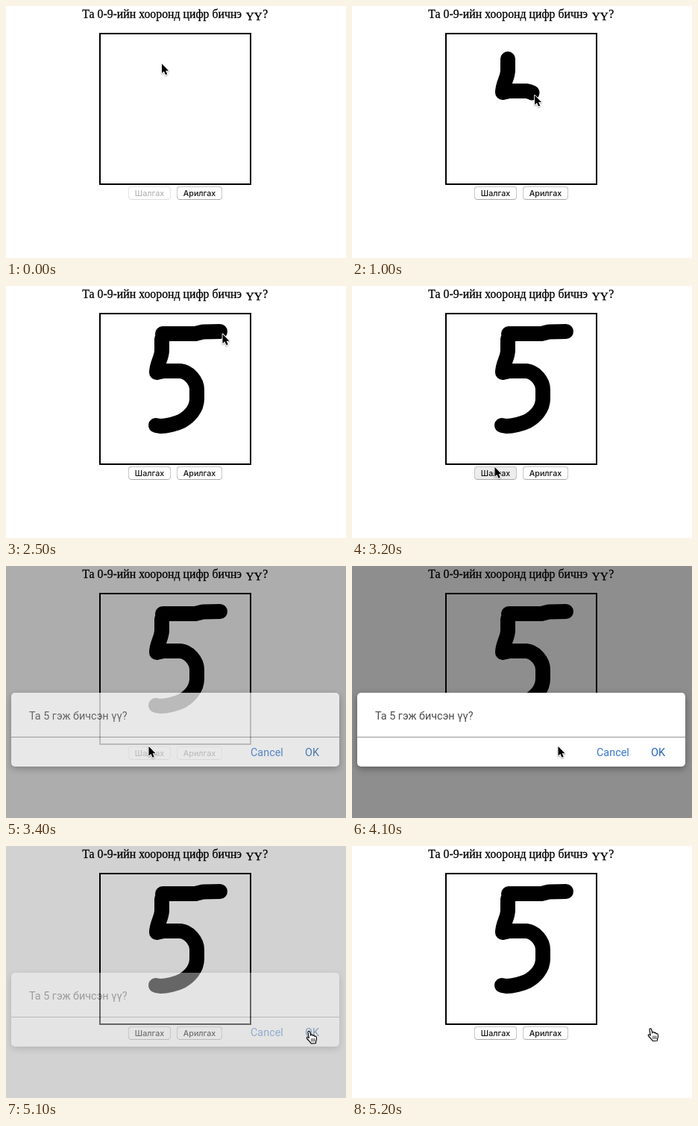
Animation of 456 by 338 pixels, one loop 5300 ms. Source, as an HTML page with a canvas:

```html
<!DOCTYPE html>
<html lang="mn">
<head>
<meta charset="utf-8">
<title>Цифр бичих</title>
<style>
html, body { margin: 0; width: 456px; height: 338px; overflow: hidden; background: #fff; }
canvas { display: block; }
svg { position: absolute; left: 0; top: 0; }
</style>
</head>
<body>
<canvas id="stage" width="456" height="338"></canvas>
<svg width="0" height="0"><path id="ruler"/></svg>
<script>
const W = 456, H = 338, LOOP = 5300, STEP = 100;
const SERIF = '"Liberation Serif", serif';
const UI = 'Inter, sans-serif';
const DIALOG = 'Roboto, sans-serif';
const ctx = document.getElementById('stage').getContext('2d');
const ruler = document.getElementById('ruler');

const linear = k => k;
const speedUp = k => k ** 1.65;
const slowDown = k => 1 - (1 - k) ** 2.7;

// One leg of the pointer's way; times count steps of 100 ms.
function leg(from, to, d, ease = linear, pen = false) {
  const track = ruler.cloneNode();
  track.setAttribute('d', d);
  const length = track.getTotalLength();
  const run = n => length * ease(Math.min(1, Math.max(0, (n - from) / (to - from))));
  return { from, pen, run, shape: new Path2D(d), at: n => track.getPointAtLength(run(n)) };
}

const BODY = 'M209 71V86C209 97 202 104 202 116L211 114H234C245 115 256 127 256 139' +
  'V151C256 165 246 175 236 181C228 185 215 188 207 188L201 187';
const legs = [
  leg(0, 2, 'M208.5 77L212 76.5'),
  leg(4, 14, BODY, speedUp, true),
  leg(14.5, 21, 'M204 183C205 140 245 115 211 74.5'),
  leg(22, 25, 'M210 64H254L264 61.5L287 61', linear, true),
  leg(25.1, 33, 'M289 63C270 130 190 200 192 274L191 241.5', slowDown),
  leg(41, 46, 'M276 241.5Q340 268 416 258', slowDown),
  leg(46, 50, 'M416 258L412 252'),
  leg(50, 52, 'M412 252L400 245')
];

function pointerAt(n) {
  const current = legs.findLast(l => l.from <= n);
  const { x, y } = current.at(n);
  const lead = current.pen ? 3 : 0;
  return [x + lead, y + lead];
}

function dialogAlpha(n) {
  if (n < 34) return 0;
  if (n > 50) return 0.4 * (52 - n);
  return 1 - 0.27 * (Math.max(0, 38 - n) / 4) ** 2;
}

function text(c, str, x, y, font, color, align = 'left') {
  c.font = font;
  c.fillStyle = color;
  c.textAlign = align;
  c.fillText(str, x, y);
}

function heading(str, x, y, size) {
  text(ctx, str, x, y, `${size}px ${SERIF}`, '#000');
  ctx.strokeStyle = '#000';
  ctx.lineWidth = 0.3;
  ctx.strokeText(str, x, y);
}

function box(c, x, y, w, h, r, fill) {
  c.beginPath();
  c.roundRect(x, y, w, h, r);
  c.fillStyle = fill;
  c.fill();
}

function button(label, x, w, state) {
  const off = state === 'disabled';
  box(ctx, x, 242, w, 18, 4.5, off ? '#dcdcdc' : '#a8a8a8');
  box(ctx, x, 242, w, 17, 4.5, off ? '#e6e6e6' : '#c8c8c8');
  box(ctx, x + 1, 243, w - 2, 16, 3.5, state === 'pressed' ? '#ededed' : '#fff');
  text(ctx, label, x + w / 2, 255, '500 10.7px ' + UI, off ? '#b4b4b4' : '#111', 'center');
}

function drawPen(stroke, n) {
  if (n < stroke.from) return;
  ctx.save();
  ctx.setLineDash([Math.max(0.01, stroke.run(n)), 999]);
  ctx.lineWidth = 20;
  ctx.lineCap = ctx.lineJoin = 'round';
  ctx.strokeStyle = '#000';
  ctx.stroke(stroke.shape);
  ctx.restore();
}

function drawPage(n) {
  ctx.fillStyle = '#fff';
  ctx.fillRect(0, 0, W, H);
  heading('Та 0-9-ийн хооронд цифр бичнэ', 102.3, 16, 15.8);
  heading('ҮҮ', 321.8, 19, 15.2);
  heading('?', 344.3, 16, 15.8);
  ctx.lineWidth = 2;
  ctx.strokeStyle = '#000';
  ctx.strokeRect(126, 37, 202, 202);
  for (const l of legs) if (l.pen) drawPen(l, n);
  const pressed = n === 32 || n === 33;
  button('Шалгах', 164, 57, n < 4 ? 'disabled' : pressed ? 'pressed' : '');
  button('Арилгах', 229, 61, '');
}

// The dialog is composed on its own layer so that it fades as a whole.
function dialogLayer(hover) {
  const layer = document.createElement('canvas');
  layer.width = W;
  layer.height = H;
  const c = layer.getContext('2d');
  c.shadowColor = 'rgba(0,0,0,0.35)';
  c.shadowBlur = 10;
  c.shadowOffsetY = 3;
  box(c, 7, 170, 440, 99, 5, '#fff');
  c.shadowColor = 'transparent';
  c.fillStyle = '#949898';
  c.fillRect(7, 229, 440, 1);
  const font = '14.4px ' + DIALOG;
  text(c, 'Та 5 гэж бичсэн үү?', 31, 206, font, '#4c4c4c');
  text(c, 'Cancel', 328, 255, font, '#3777cf');
  text(c, 'OK', 401, 255, font, hover ? '#174f9c' : '#2163b9');
  return layer;
}

const idleDialog = dialogLayer(false), hoverDialog = dialogLayer(true);

function drawDialog(alpha, hover) {
  ctx.fillStyle = `rgba(0,0,0,${0.443 * alpha})`;
  ctx.fillRect(0, 0, W, H);
  ctx.globalAlpha = alpha;
  ctx.drawImage(hover ? hoverDialog : idleDialog, 0, 0);
  ctx.globalAlpha = 1;
}

const arrow = new Path2D('M0 0V14L3.2 11.1L5.6 16.4L8 15.4L5.7 10.2H10Z');
const hand = new Path2D('M4.4 10L3 2.6C2.7 .6 5.2 .2 5.6 2L6.9 7V6C7 4.9 9 5 9.2 6.2' +
  'L9.5 7C9.7 6 11.6 6.2 11.8 7.4L12 8C12.3 7.2 14 7.4 14.3 8.8C14.9 11 14.6 12.5 13.6 14.5' +
  'L13.4 17L7.2 17.3C6.5 15.5 3.5 13 1.6 10.6C.6 9.2 2.2 8.4 3 9Z');
const knuckles = new Path2D('M7.8 11V14.6M9.8 11V14.6M11.8 11V14.6');

function castShadow(on) {
  ctx.shadowColor = on ? 'rgba(0,0,0,0.35)' : 'transparent';
  ctx.shadowBlur = 2;
  ctx.shadowOffsetY = 1;
}

function drawArrow(x, y) {
  ctx.translate(x + 0.5, y + 0.5);
  ctx.scale(0.9, 0.9);
  castShadow(true);
  ctx.strokeStyle = '#fff';
  ctx.lineWidth = 2;
  ctx.stroke(arrow);
  castShadow(false);
  ctx.fillStyle = '#000';
  ctx.fill(arrow);
}

function drawHand(x, y) {
  ctx.translate(x - 4, y - 1);
  castShadow(true);
  ctx.fillStyle = '#fff';
  ctx.fill(hand);
  castShadow(false);
  ctx.strokeStyle = '#000';
  ctx.lineWidth = 1.1;
  ctx.stroke(hand);
  ctx.lineWidth = 0.8;
  ctx.stroke(knuckles);
}

function frame() {
  const n = Math.floor((performance.now() % LOOP) / STEP);
  const overLink = n >= 44;
  const alpha = dialogAlpha(n);
  drawPage(n);
  if (alpha > 0) drawDialog(alpha, overLink);
  ctx.save();
  ctx.lineJoin = ctx.lineCap = 'round';
  (overLink ? drawHand : drawArrow)(...pointerAt(n));
  ctx.restore();
  requestAnimationFrame(frame);
}
frame();
</script>
</body>
</html>
```
